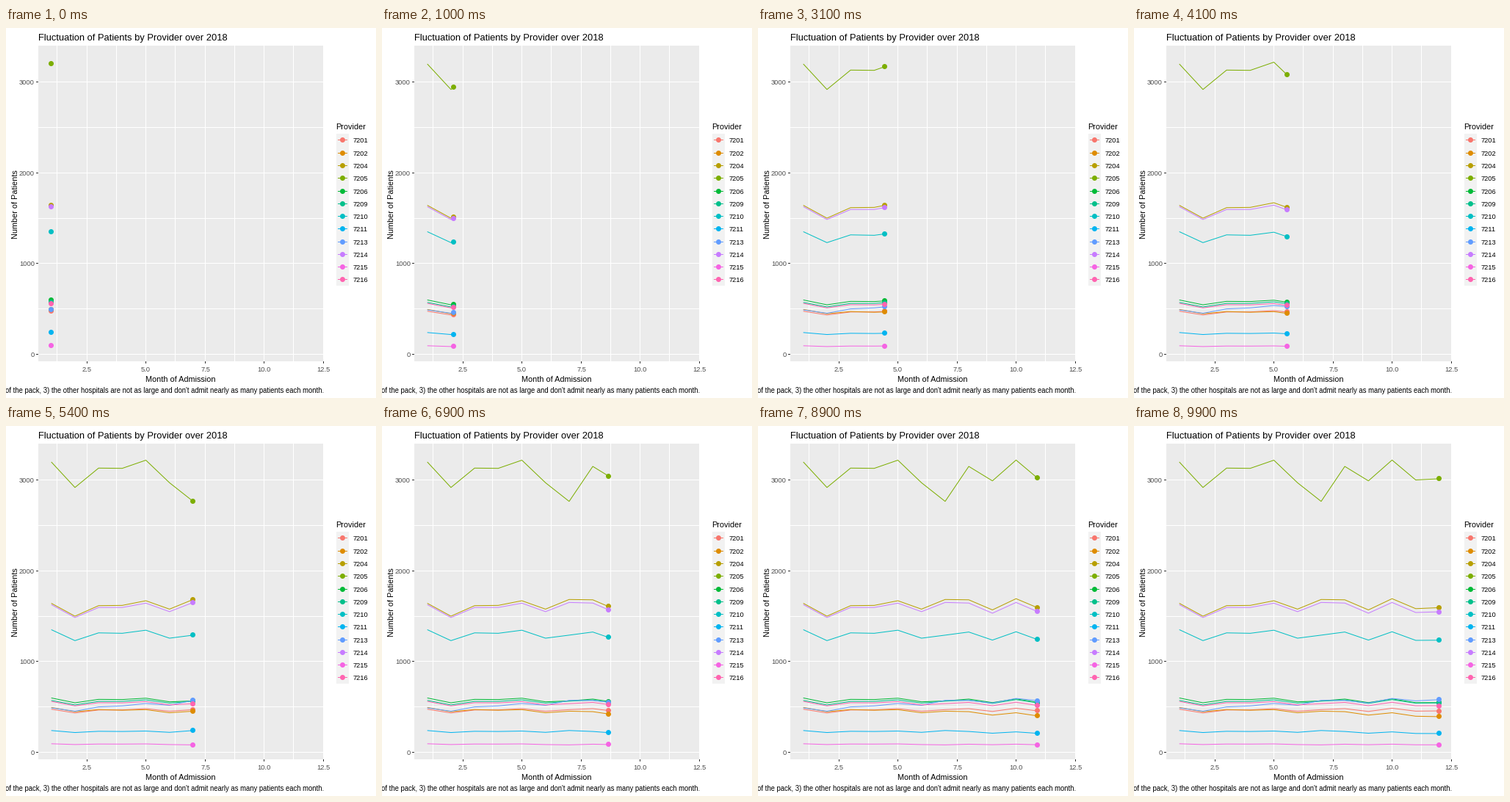
Animation of 504x504 px, one loop 10 s. Source, as a matplotlib script:

```python
import numpy as np
import matplotlib.pyplot as plt
from matplotlib.animation import FuncAnimation
from matplotlib.patches import Circle, Rectangle

SIZE, DPI = 504, 72
FRAMES, INTERVAL = 100, 100
LEFT, RIGHT, TOP, BOTTOM = 44, 433, 24, 454

plt.rcParams["font.family"] = "Liberation Sans"

MONTHS = np.arange(1, 13)
# share of an average month, common to all providers
SEASON = np.array([1.03, 0.94, 1.01, 1.01, 1.04, 0.97,
                   0.965, 1.03, 0.97, 1.045, 0.975, 0.98])
# provider: (colour, mean level, drift over the year, extra in July)
PROVIDERS = {
    "7201": ("#F8766D", 464, 0.01, 0.05),
    "7202": ("#DE8C00", 442, -0.18, 0.07),
    "7204": ("#B79F00", 1610, 0.02, 0.08),
    "7205": ("#7CAE00", 3090, -0.01, -0.07),
    "7206": ("#00BA38", 571, -0.04, 0.03),
    "7209": ("#00C08B", 556, 0.00, 0.05),
    "7210": ("#00BFC4", 1287, -0.04, 0.04),
    "7211": ("#00B4F0", 223, -0.10, 0.12),
    "7213": ("#619CFF", 533, 0.22, 0.10),
    "7214": ("#C77CFF", 1580, 0.00, 0.08),
    "7215": ("#F564E3", 89, -0.08, -0.03),
    "7216": ("#FF64B0", 535, -0.04, 0.04),
}


def px(month):
    return 61.72 + 32.2 * (np.asarray(month) - 1)


def py(count):
    return 444.6 - 0.1237 * np.asarray(count)


def yearly(level, drift, july):
    trend = drift * (MONTHS - 6.5) / 11
    summer = july * np.exp(-2.0 * (MONTHS - 7) ** 2)
    return level * (SEASON + trend + summer)


fig = plt.figure(figsize=(SIZE / DPI, SIZE / DPI), dpi=DPI, facecolor="white")
ax = fig.add_axes([0, 0, 1, 1])
ax.set_xlim(0, SIZE)
ax.set_ylim(SIZE, 0)
ax.axis("off")


def box(x, y, w, h, color, z=0):
    ax.add_patch(Rectangle((x, y), w, h, fc=color, lw=0, zorder=z))


def dot(x, y, color):
    return ax.add_patch(Circle((x, y), 3.5, fc=color, lw=0, zorder=5))


def label(x, y, text, size, color="black", ha="left", **kw):
    ax.text(x, y, text, fontsize=size, color=color, ha=ha, va="baseline", **kw)


def draw_panel():
    box(LEFT, TOP, RIGHT - LEFT, BOTTOM - TOP, "#EBEBEB")
    for m in np.arange(1.25, 12.6, 1.25):
        x = np.floor(px(m))
        box(x, TOP, 1, BOTTOM - TOP, "white", 1)
        if m % 2.5 == 0:
            box(x, BOTTOM, 1, 3, "#333333", 1)
            label(x + 0.5, 468, f"{m:.1f}", 9.4, "#4D4D4D", "center")
    for v in range(0, 3001, 500):
        y = np.floor(py(v))
        box(LEFT, y, RIGHT - LEFT, 1, "white", 1)
        if v % 1000 == 0:
            box(LEFT - 3, y, 3, 1, "#333333", 1)
            label(39, y + 4, str(v), 9.4, "#4D4D4D", "right")


def draw_titles():
    label(43.5, 17, "Fluctuation of Patients by Provider over 2018", 12.9)
    label(237.5, 482, "Month of Admission", 10.85, ha="center")
    label(16, 240, "Number of Patients", 10.85, ha="center",
          rotation=90, rotation_mode="anchor")
    label(433, 497, "of the pack, 3) the other hospitals are not as large and "
          "don't admit nearly as many patients each month.", 9.55, ha="right")


def draw_legend():
    label(449.5, 138, "Provider", 10.85)
    key = 17.28
    box(450, 144, 17, 12 * key, "#F2F2F2")
    for i, (name, (color, *_)) in enumerate(PROVIDERS.items()):
        y = np.floor(152.9 + i * key)
        box(452, y, 13, 1, color, 2)
        dot(458.5, y + 0.5, color)
        label(473, y + 4, name, 9.2)


draw_panel()
draw_titles()
draw_legend()

series = []
for color, *rule in PROVIDERS.values():
    line, = ax.plot([], [], color=color, lw=1, solid_capstyle="butt", zorder=4)
    series.append((yearly(*rule), line, dot(0, 0, color)))


def update(i):
    now = 1 + 11 * i / (FRAMES - 1)
    past = MONTHS < now - 1e-6
    months = np.append(MONTHS[past], now)
    xs = px(months)
    for counts, line, head in series:
        ys = py(np.interp(months, MONTHS, counts))
        line.set_data(xs, ys)
        head.center = np.floor(xs[-1]) + 0.5, np.floor(ys[-1]) + 0.5
    return [artist for _, *pair in series for artist in pair]


anim = FuncAnimation(fig, update, frames=FRAMES, interval=INTERVAL,
                     repeat=True, repeat_delay=0)
plt.show()
```
